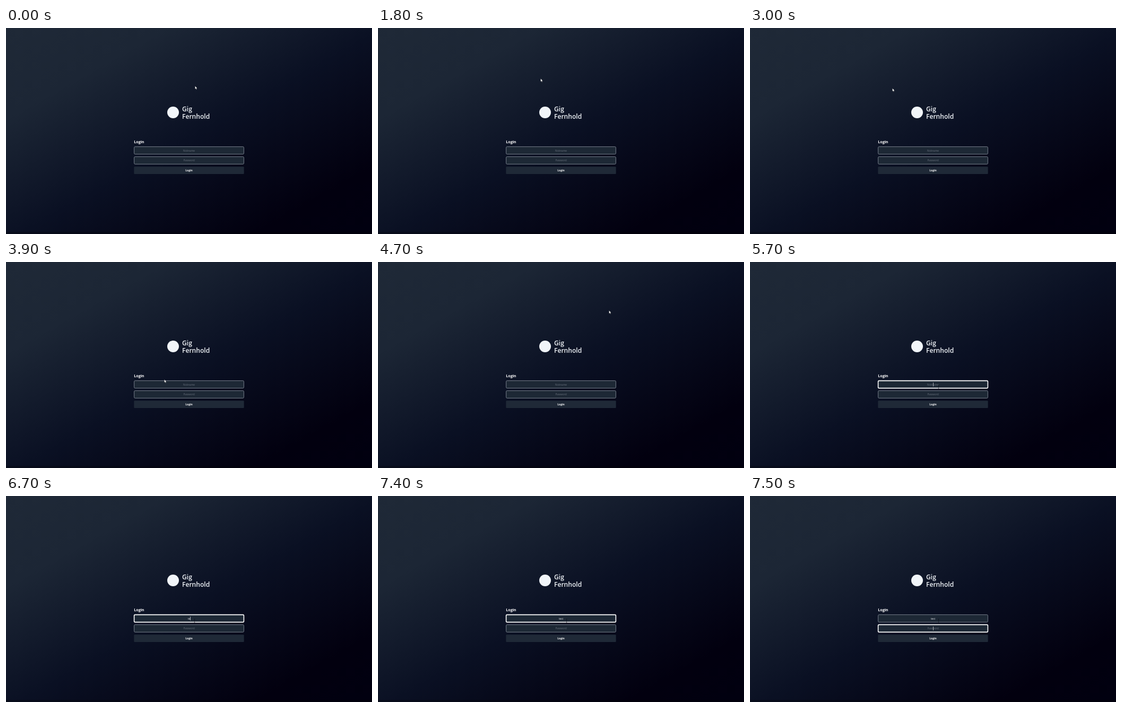
Recreate the animation shown at these times as an HTML page. Size 690x388 px, loop 8000 ms.

```html
<!DOCTYPE html>
<html lang="en">
<head>
<meta charset="utf-8">
<title>Login</title>
<style>
  html, body { margin: 0; width: 100%; height: 100%; overflow: hidden; }
  body {
    background: linear-gradient(to bottom right,
      #1f2937 0%, #1c2635 22%, #0a1023 52%, #02000f 84%, #010010 100%);
  }
  svg { display: block; width: 690px; height: 388px; font-family: "Open Sans", "Noto Sans", sans-serif; }
  .brand { font-size: 12.1px; font-weight: 600; fill: #f1f5f9; }
  .title { font-size: 7.1px; font-weight: 700; fill: #fff; }
  .button { font-size: 4.9px; font-weight: 700; fill: #fff; }
  .field rect { fill: #1d2835; stroke: #8f96a3; stroke-width: .8; }
  .field text { font-size: 4.7px; fill: #69717d; }
  .field.filled text { fill: #e5e7eb; }
  .field.focus rect { stroke: #fff; stroke-width: 1.6; }
  .mid { text-anchor: middle; }
</style>
</head>
<body>
<svg viewBox="0 0 690 388">
  <rect y="384" width="690" height="4" fill="#000" opacity=".25"/>
  <circle cx="315" cy="159" r="11" fill="#f1f5f9"/>
  <text class="brand" x="332" y="157">Gig</text>
  <text class="brand" x="332" y="171.3">Fernhold</text>
  <text class="title" x="241.3" y="217">Login</text>

  <g class="field" id="name">
    <rect x="241.6" y="223.6" width="206.8" height="14" rx="1.8"/>
    <text class="mid" x="345" y="232.5"></text>
  </g>
  <g class="field" id="pass">
    <rect x="241.6" y="242.4" width="206.8" height="14" rx="1.8"/>
    <text class="mid" x="345" y="251.3">Password</text>
  </g>

  <rect x="241.3" y="261.2" width="207.4" height="13.8" rx="1.2" fill="#1f2937"/>
  <text class="button mid" x="345" y="269.8">Login</text>

  <rect id="caret" width=".7" height="7" fill="#e5e7eb"/>
  <path id="arrow" d="M0 0V5.9L1.4 4.7 2.3 6.8 3.3 6.3 2.4 4.4H4.2Z"
        fill="#fff" stroke="#05070d" stroke-width=".35"/>
  <path id="beam" d="M-1-3.5H1M0-3.5V3.5M-1 3.5H1"
        fill="none" stroke="#05070d" stroke-width=".7" opacity=".7"/>
</svg>
<script>
const LOOP = 8000;
const $ = id => document.getElementById(id);
const [nameField, passField, caret, arrow, beam] = ["name", "pass", "caret", "arrow", "beam"].map($);
const nameText = nameField.querySelector("text");

// [time, x, y, pointer shape]
const moves = [
  [0, 356.4, 109.2, arrow],
  [100, 356.8, 109.2, arrow],
  [1800, 306.6, 95.2, arrow],
  [2800, 268.5, 113.5, arrow],
  [3300, 282.2, 153.6, arrow],
  [3800, 294, 203, arrow],
  [3900, 298.5, 221.2, arrow],
  [4400, 298.5, 207.2, arrow],
  [4600, 398, 122, arrow],
  [4700, 435.5, 91.2, arrow],
  [4800, 433, 77.3, arrow],
  [4900, 435.2, 103.2, arrow],
  [5200, 368.4, 195.2, arrow],
  [5400, 359, 247, beam],
  [5500, 355.5, 235.3, beam]
];

// [time, typed text]
const typing = [[0, ""], [6400, "t"], [6700, "te"], [6800, "tes"], [7000, "test"]];

// [time, focused field]
const focus = [[0, null], [5600, nameField], [7500, passField]];

// [time, caret shown]
const blink = [[0, false], [5600, true], [6100, false], [6400, true], [7400, false], [7500, true]];

const at = (steps, t) => steps.findLast(step => step[0] <= t);
const show = (el, on) => el.setAttribute("visibility", on ? "visible" : "hidden");

function draw(t) {
  const [, x, y, shape] = at(moves, t);
  show(arrow, shape === arrow);
  show(beam, shape === beam);
  shape.setAttribute("transform", `translate(${x} ${y})`);

  const typed = at(typing, t)[1];
  const label = typed || "Nickname";
  if (nameText.textContent !== label) nameText.textContent = label;
  nameField.classList.toggle("filled", typed !== "");

  const active = at(focus, t)[1];
  for (const field of [nameField, passField]) field.classList.toggle("focus", field === active);

  const width = active === nameField && typed ? nameText.getComputedTextLength() : 0;
  caret.setAttribute("x", 345 + width / 2);
  caret.setAttribute("y", active === passField ? 246 : 227.2);
  show(caret, at(blink, t)[1]);
}

function tick() {
  draw(performance.now() % LOOP);
  requestAnimationFrame(tick);
}
tick();
</script>
</body>
</html>
```
